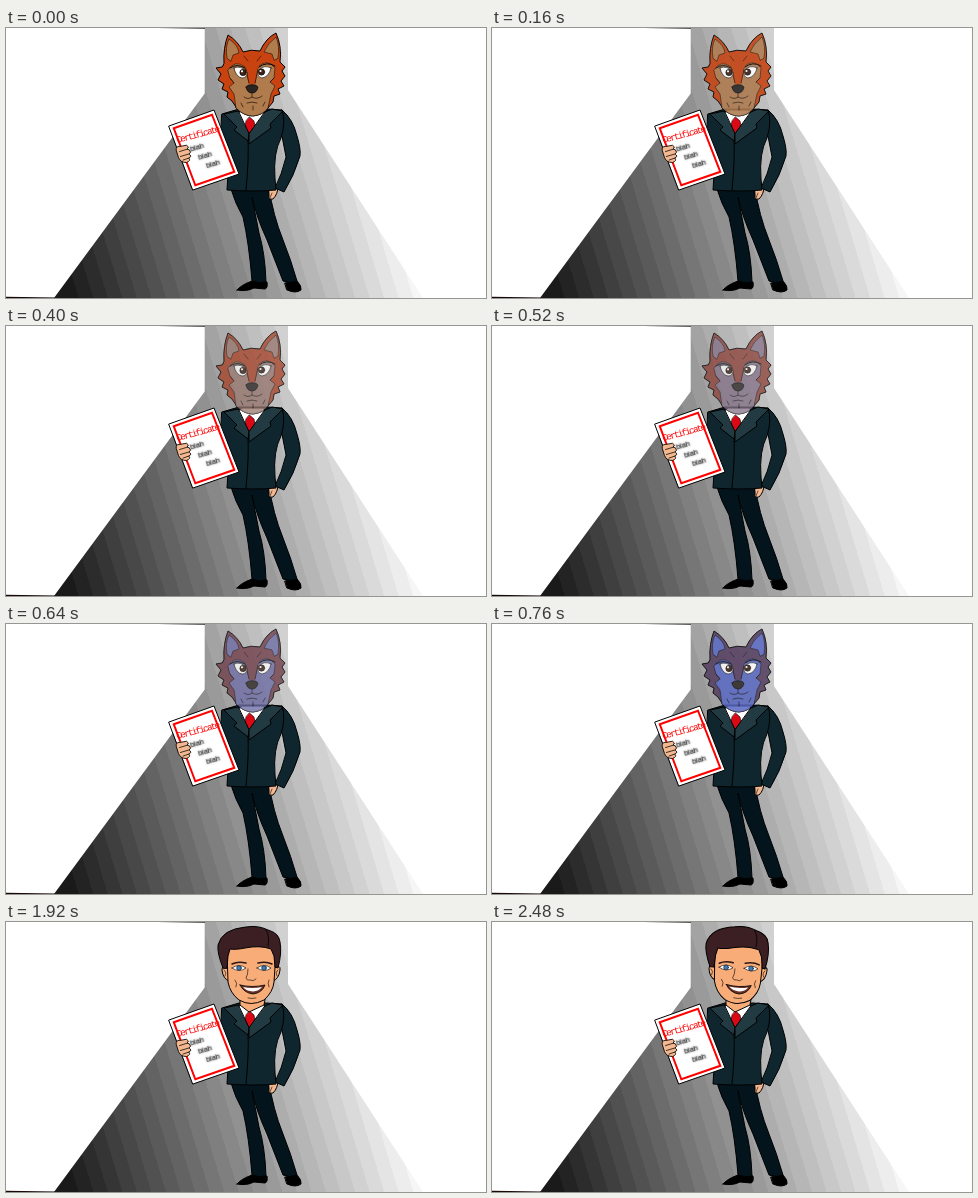
An HTML page that plays this animation: 480 by 270 pixels, repeating every 4.84 s.

```html
<!DOCTYPE html>
<html lang="en">
<head>
<meta charset="utf-8">
<title>Certificate</title>
<style>
html, body { margin: 0; width: 100%; height: 100%; overflow: hidden; background: #fff; }
svg { display: block; width: 100vw; height: 100vh; }
.ink { stroke: #000; stroke-width: 1; stroke-linejoin: round; stroke-linecap: round; }
.line { fill: none; }
.suit { fill: #10262e; }
.lapel { fill: #223a41; }
.trousers { fill: #04141c; }
.skin { fill: #f8ad79; }
.hand { fill: #f4b890; }
.hair { fill: #3b1f22; }
.fur { fill: var(--fur); }
.pale { fill: var(--pale); }
.title { font: 9.4px "Liberation Mono", monospace; letter-spacing: -1.7px; fill: #f00; }
.blah { font: 7.4px "Liberation Sans", sans-serif; fill: #222; filter: blur(.6px); }
.shade { fill: #777; filter: blur(1.2px); }

.red, .blue, .level, .tilted { animation: 4840ms step-end infinite; }
.red { --fur: #c8430f; --pale: #b17c4d; animation-name: fade-out; }
.blue { --fur: #323a74; --pale: #3f62e2; animation-name: fade-in; }
.level { animation-name: level; }
.tilted { animation-name: tilted; }
@keyframes fade-out {
  0%, .826% { opacity: 1; animation-timing-function: steps(22, end); }
  19.008%, 100% { opacity: 0; }
}
@keyframes fade-in {
  0%, .826% { opacity: 0; animation-timing-function: steps(22, end); }
  19.008% { opacity: 1; }
  39.669%, 100% { opacity: 0; }
}
@keyframes level {
  0% { visibility: hidden; }
  39.669% { visibility: visible; }
  51.24%, 100% { visibility: hidden; }
}
@keyframes tilted {
  0% { visibility: hidden; }
  51.24%, 100% { visibility: visible; }
}
</style>
</head>
<body>
<svg viewBox="0 0 480 270" preserveAspectRatio="none">
  <defs>
    <linearGradient id="floor" gradientUnits="userSpaceOnUse" x1="57" y1="266" x2="404" y2="162"></linearGradient>

    <g id="wolf" class="ink" stroke-width=".9">
      <path class="pale" d="M227 60L230 80Q238 88 247 88Q257 87 262 80L266 60Z"/>
      <path class="fur" d="M218 35Q217 20 222 7Q232 13 237 24Q245 21 254 23Q260 10 270 5Q276 18 274 34L279 39L276 43L279 48L275 53L278 58L272 61L274 66L268 68L267 74L262 80L261 68L231 68L230 79L226 73L221 69L222 64L216 61L218 56L212 52L215 46L210 40L216 39Z"/>
      <path class="pale" d="M221 30Q219 19 223 11Q232 17 233 25L227 27L225 33ZM272 30Q274 18 270 9Q261 16 258 24L266 26L268 32Z" style="stroke-width:.5"/>
      <path class="pale" d="M222 42Q229 31 239 39L243 55Q246 58 249 55L252 39Q261 30 269 40L268 50L264 54L269 58L265 66L262 80Q257 87 247 88Q238 88 230 80L228 66L223 59L228 55L224 50Z" style="stroke-width:.5"/>
      <path class="fur" d="M237 31L246 34L255 31L252 41L249 56H243L240 41Z" style="stroke:none"/>
      <path class="line" d="M240 41L243 55M252 41L249 55M238 28L242 33M255 28L251 33M224 50L228 55M268 50L264 54" style="stroke-width:.5"/>
      <path fill="#fff" d="M228 40Q235 37 241 44Q241 50 236 50Q230 49 228 40ZM265 40Q258 36 252 43Q251 49 256 50Q263 49 265 40Z" style="stroke-width:.6"/>
      <g fill="#3c2218" style="stroke-width:.5">
        <circle cx="237" cy="44.500" r="3.200"/><circle cx="255.500" cy="44" r="3.200"/>
      </g>
      <g fill="#fff" stroke="none">
        <circle cx="236" cy="43.300" r="1.100"/><circle cx="254.500" cy="43" r="1.100"/>
      </g>
      <path class="line" d="M224 40Q231 35 239 40M253 39Q261 33 269 38"/>
      <path fill="#2a2523" d="M240 59Q242 56 246 57Q250 56 252 59Q251 65 246 65Q241 65 240 59Z" style="stroke-width:.6"/>
      <path class="line" d="M246 65V69M238 69Q242 72 246 69Q251 72 256 68M241 75Q246 73 251 75M235 75L237 79M259 74L257 78M247 78V82" style="stroke-width:.6"/>
    </g>

    <g id="man" class="ink">
      <path class="skin" d="M222 46Q216 42 216 48Q217 57 223 59ZM268 46Q275 42 274 48Q273 57 267 59Z"/>
      <path class="skin" d="M221 30L222 60Q224 71 233 78Q245 85 258 78Q267 70 268 60L270 30L262 20H228Z"/>
      <path class="hair" d="M217 46Q211 31 212 23Q216 7 240 5Q252 3 262 8Q273 11 274 20Q276 31 272 46L269 45L268 34L265 27Q254 23 239 26Q229 28 224 27L222 34L221 46Z"/>
      <path class="line" d="M260 8Q264 14 262 24" style="stroke-width:.8"/>
      <path class="line" d="M226 42Q232 39 240 41M252 41Q260 39 266 42" style="stroke:#2c1715;stroke-width:1.6"/>
      <path fill="#fff" d="M226 46Q233 41 240 46Q233 51 226 46ZM251 46Q258 41 265 46Q259 51 251 46Z" style="stroke-width:.6"/>
      <g fill="#3f7cb8" style="stroke-width:.5">
        <circle cx="233" cy="46" r="2.400"/><circle cx="258" cy="46" r="2.400"/>
      </g>
      <path class="line" d="M242 47Q242 53 240 56Q241 59 244 58Q247 60 250 57M229 58Q232 61 230 65M263 58Q261 61 263 65M218 48Q221 50 219 54M272 48Q269 50 271 54M242 76Q246 77 250 76" style="stroke-width:.6"/>
      <path fill="#693128" d="M234 63Q246 66 259 63Q256 71 247 72Q238 71 234 63Z" style="stroke-width:.8"/>
      <path fill="#fff" d="M237 65Q246 67 256 65Q253 69 247 69.500Q240 69 237 65Z" stroke="none"/>
    </g>
    <path id="neck" class="skin ink" d="M234 72V83L243 90L258 83L260 72Z" stroke-width=".7"/>
  </defs>

  <path fill="url(#floor)" d="M198.700 0H282V62L417 270H48L198.700 65.500Z"/>
  <path fill="#180808" d="M0 268.700L49 269.500V270H0Z"/>
  <path fill="#222" d="M152 0H199V.8Z"/>

  <!-- legs and shoes -->
  <g class="ink">
    <path fill="#000" d="M231 262Q235 257 246 253L261 254Q262 260 259 261L248 260Q240 264 231 262Z"/>
    <path fill="#000" d="M279 255L291 253Q296 258 295 262Q290 266 281 262Z"/>
    <path class="trousers" d="M225 161Q229 175 237 189Q243 215 246 253Q254 256 260 254Q259 225 253 205L246 169Q250 188 261 212L277 253Q284 256 291 253Q285 232 277 212Q267 187 263 160Z"/>
  </g>

  <!-- jacket -->
  <g class="ink">
    <path class="hand" d="M263 161L272 158Q272 166 267 171Q262 172 263 168Z"/>
    <path class="line" d="M266 165L264 170" style="stroke-width:.6"/>
    <path class="suit" d="M276 82Q287 91 291 108Q295 121 294 128Q288 148 278 164L269 160Q276 146 280 129L276 108L268 104Z"/>
    <path class="suit" d="M216 86L233 81H261L276 82Q280 94 275 110Q267 125 269 151L270 162Q250 164 221 162L223 130L215 105Z"/>
    <path class="line" d="M242 110Q243 132 240 162"/>
    <path fill="#fff" d="M232 85L236 82H258L259 87L243 106Z"/>
    <path fill="#d90916" d="M243.500 89L248 93L249 98L243 106L239 98L240 93Z" style="stroke-width:.6"/>
    <path class="lapel" d="M232 83L218 86L231 99L228 102L242 113L243 106Z"/>
    <path class="lapel" d="M259 84L266 81L277 83L264 96L265 100L243 116V106Z"/>
  </g>

  <!-- certificate -->
  <path class="ink" fill="#fff" d="M163 98L208 82L233 146L187 162Z"/>
  <path fill="none" stroke="#f00" stroke-width="2" d="M167.800 100.300L206 86.700L228.300 143.800L189.300 157.300Z"/>
  <text class="title" transform="translate(171.300 115) rotate(-15)">Certificate</text>
  <g id="lines"></g>
  <g class="ink hand" transform="rotate(-10 177 126)">
    <path d="M171 121Q171 117 175 118L182 118Q185 120 182 122L184 123Q186 126 183 127Q186 130 182 131Q184 134 179 135Q173 134 172 129Z" style="stroke-width:.8"/>
    <path class="line" d="M182 122L174 123M183 127L174 128M182 131L176 132" style="stroke-width:.7"/>
  </g>

  <!-- heads -->
  <use class="blue" href="#wolf"/>
  <use class="red" href="#wolf"/>
  <g class="level"><use href="#neck"/><use href="#man"/></g>
  <g class="tilted"><use href="#neck"/><use href="#man" transform="rotate(2.500 246 70)"/></g>
</svg>
<script>
const NS = "http://www.w3.org/2000/svg";
const add = (parent, tag, attrs, text = "") => {
  const el = document.createElementNS(NS, tag);
  for (const key in attrs) el.setAttribute(key, attrs[key]);
  el.textContent = text;
  parent.append(el);
};

// Flat grey bands across the floor
const bands = 26;
const floor = document.getElementById("floor");
for (let i = 0; i < bands; i++) {
  const grey = Math.round(26 + 229 * i / (bands - 1));
  for (const edge of [i, i + 1])
    add(floor, "stop", { offset: edge / bands, "stop-color": `rgb(${grey},${grey},${grey})` });
}

// Soft lines of writing, each with a shadow
const lines = document.getElementById("lines");
for (let i = 0; i < 3; i++) {
  const transform = `translate(${185 + 8 * i} ${123.5 + 8.3 * i}) rotate(-16)`;
  add(lines, "text", { class: "blah shade", transform }, "blah");
  add(lines, "text", { class: "blah", transform }, "blah");
}
</script>
</body>
</html>
```
